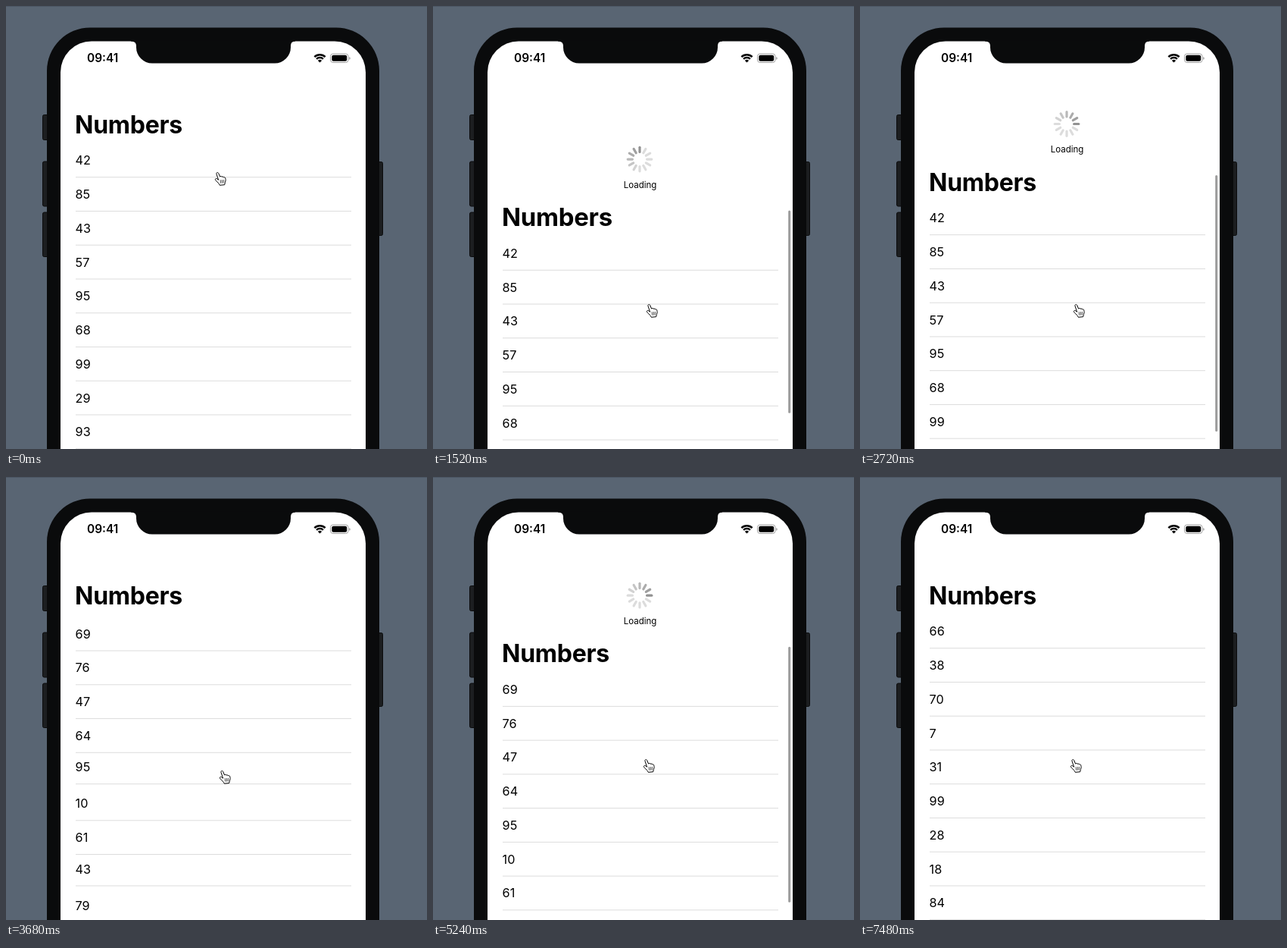
An HTML page for the animation above (7.52 s loop, 556 by 584 pixels).

```html
<!DOCTYPE html>
<html lang="en">
<head>
<meta charset="utf-8">
<title>Pull to refresh</title>
<style>
  html, body { margin: 0; width: 100%; height: 100%; overflow: hidden; background: #596573; }
  svg { display: block; width: 556px; height: 584px; font-family: Inter, "Open Sans", sans-serif; }
  .row { font-size: 16.2px; }
  .row line { stroke: #dcdcdc; }
  .title { font-size: 32px; font-weight: 700; letter-spacing: -.25px; }
  .time { font-size: 15.4px; font-weight: 600; }
  .label { font-size: 11.5px; text-anchor: middle; }
  .button { fill: #1c1e20; stroke: #0a0b0c; }
</style>
</head>
<body>
<svg viewBox="0 0 556 584">
  <defs>
    <clipPath id="screen"><rect x="72" y="46.5" width="403" height="700" rx="41"/></clipPath>
    <clipPath id="below"><rect x="72" y="137" width="403" height="447"/></clipPath>
  </defs>

  <rect width="556" height="584" fill="#596573"/>
  <rect width="556" height="1" fill="#4c5764"/>

  <g class="button">
    <rect x="48.5" y="143.5" width="10" height="33" rx="2"/>
    <rect x="48.5" y="205" width="10" height="59" rx="2"/>
    <rect x="48.5" y="272" width="10" height="58.5" rx="2"/>
    <rect x="487" y="205.5" width="10.5" height="97" rx="2"/>
  </g>
  <rect x="54" y="28.5" width="439" height="720" rx="57" fill="#0a0b0c"/>
  <rect x="72" y="46.5" width="403" height="700" rx="41" fill="#fff"/>

  <g clip-path="url(#screen)">
    <g id="rows"></g>
    <text id="title" class="title" x="0" y="0">Numbers</text>
    <g clip-path="url(#below)">
      <g id="control">
        <g id="spinner"></g>
        <g id="ticks"></g>
        <text id="label" class="label" x="273.5" y="37.8"></text>
      </g>
    </g>
    <rect id="bar" x="469.2" width="3" rx="1.5" fill="#9c9c9c"/>
  </g>

  <path d="M165 45.5h217v1q-6 0 -6 6v2a21 21 0 0 1 -21 21h-162a21 21 0 0 1 -21 -21v-2q0 -6 -7 -6z" fill="#0a0b0c"/>
  <text class="time" x="107" y="74.2">09:41</text>
  <g fill="none" stroke="#000" stroke-width="2.5">
    <path d="M407.4 67.2a10 10 0 0 1 14.2 0"/>
    <path d="M410.1 69.9a6.2 6.2 0 0 1 8.8 0"/>
    <path d="M414.5 74.6l-2.6 -2.6a3.7 3.7 0 0 1 5.2 0z" fill="#000" stroke="none"/>
  </g>
  <rect x="428.5" y="63" width="23.5" height="11.5" rx="3.4" fill="none" stroke="#a2a2a2"/>
  <rect x="430.3" y="64.8" width="19.9" height="7.9" rx="2"/>
  <path d="M453.2 67v3.8q1.6 -.6 1.6 -1.9t-1.6 -1.9z" fill="#a2a2a2"/>

  <g id="hand" stroke="#000" stroke-linejoin="round" stroke-linecap="round">
    <path fill="#fff" d="M5 9L3 3C2.5 1 4.9 .2 5.7 2L7.6 6.7C8 5.6 9.7 5.7 10 6.9C10.6 6 12 6.3 12.3 7.5C13 6.8 14.5 7.2 14.8 8.7C15.3 10.6 15.2 12 14.4 13.8L13.7 17.2L7.3 17.8C6.4 15.6 4.6 13.9 2.2 11.7C.5 10 1.7 8.5 3.4 9.1L5.5 10.5Z"/>
    <path fill="none" stroke-width=".7" d="M8.2 11.2l.4 3.6M10.3 11l.2 3.7M12.4 11l-.1 3.5"/>
  </g>
</svg>
<script>
  const LOOP = 7520, HOLD = 76, PITCH = 44.75;
  const LISTS = [
    [42, 85, 43, 57, 95, 68, 99, 29, 93],
    [69, 76, 47, 64, 95, 10, 61, 43, 79],
    [66, 38, 70, 7, 31, 99, 28, 18, 84]
  ];
  const PULLS = [
    { start: 400, trigger: 1440, release: 1600, end: 3430, grab: 159, fade: 2760 },
    { start: 4260, trigger: 4945, release: 4960, end: 6940, grab: 241, fade: 6120 }
  ];
  // time, x, y of the pointer
  const PATH = [
    [0, 283, 228], [240, 206, 159], [400, 206, 159], [1500, 289, 402], [3600, 289, 402],
    [3680, 289, 396], [4160, 284, 241], [4260, 284, 241], [4640, 285, 383],
    [4910, 286, 442], [4960, 286, 442], [5220, 285, 381], [LOOP, 285, 381]
  ];

  const $ = id => document.getElementById(id);
  const clamp = v => Math.max(0, Math.min(1, v));
  const wave = v => (1 - Math.cos(Math.PI * clamp(v))) / 2;
  const rubber = d => d <= 0 ? 0 : 922 * (1 - 1 / (d * .55 / 872 + 1));

  function add(parent, tag, attrs, text) {
    const el = document.createElementNS("http://www.w3.org/2000/svg", tag);
    for (const k in attrs) el.setAttribute(k, attrs[k]);
    if (text !== undefined) el.textContent = text;
    return parent.appendChild(el);
  }
  const move = (el, x, y, s = 1) => el.setAttribute("transform", `translate(${x} ${y}) scale(${s})`);
  const fade = (el, a) => el.setAttribute("opacity", a);

  const rows = LISTS.map(list => list.map(n => {
    const g = add($("rows"), "g", { class: "row" });
    add(g, "text", { x: 91.6, y: 209.3 }, n);
    add(g, "line", { x1: 92, x2: 456, y1: 225.7, y2: 225.7 });
    return g;
  }));

  const spokes = (id, count, y1, y2, width, color) => Array.from({ length: count }, (_, i) =>
    add($(id), "line", {
      x1: 0, x2: 0, y1, y2, stroke: color, "stroke-width": width,
      "stroke-linecap": "round", transform: `rotate(${i * 360 / count})`
    }));
  const spinner = spokes("spinner", 12, -9.6, -15.8, 3.2, "#808080");
  const ticks = spokes("ticks", 10, -9.2, -14.6, 2, "#000");
  move($("ticks"), 274.5, 0);

  function slope(i, axis) {
    if (i < 1 || i > PATH.length - 2) return 0;
    const rate = k => (PATH[k + 1][axis] - PATH[k][axis]) / (PATH[k + 1][0] - PATH[k][0]);
    const a = rate(i - 1), b = rate(i);
    return a * b <= 0 ? 0 : 2 * a * b / (a + b);
  }

  function pointer(t, axis) {
    let i = 0;
    while (i < PATH.length - 2 && t >= PATH[i + 1][0]) i++;
    const p = PATH[i], q = PATH[i + 1], span = q[0] - p[0], u = (t - p[0]) / span;
    const v = 1 - u;
    return p[axis] * v * v * (1 + 2 * u) + q[axis] * u * u * (3 - 2 * u)
      + span * u * v * (v * slope(i, axis) - u * slope(i + 1, axis));
  }

  function offset(t, p) {
    if (t < p.start) return 0;
    if (t < p.release) return rubber(pointer(t, 2) - p.grab);
    const settle = s => HOLD + (rubber(pointer(p.release, 2) - p.grab) - HOLD) * Math.exp((p.release - s) / 75);
    return t < p.end ? settle(t) : HOLD * (1 - wave((t - p.end) / 250));
  }

  function drawRows(t, off) {
    const now = PULLS.filter(p => t >= p.end).length;
    const since = now ? t - PULLS[now - 1].end : LOOP;
    const shown = clamp(since / 200);
    const late = HOLD * (1 - wave(since / 290));
    const settling = since < 300;
    rows.forEach((group, k) => group.forEach((row, i) => {
      const value = LISTS[k][i];
      let alpha = 0, y = off + i * PITCH;
      if (k === now) {
        const from = now ? LISTS[now - 1].indexOf(value) : i;
        alpha = from < 0 ? shown : 1;
        if (settling) y = from < 0 ? late + i * PITCH : off + (from + (i - from) * wave(since / 250)) * PITCH;
      } else if (k === now - 1 && !LISTS[now].includes(value)) {
        alpha = 1 - shown;
      }
      fade(row, alpha);
      move(row, 0, y);
    }));
  }

  function draw(t) {
    const p = t < PULLS[1].start ? PULLS[0] : PULLS[1];
    const off = offset(t, p);
    const loading = t >= p.trigger;
    const inset = loading ? HOLD * clamp((t - p.trigger) / 60) : 0;
    const over = Math.max(0, off - inset);

    drawRows(t, off);
    move($("title"), 91, 167.7 + off, t < p.end ? 1 + .0006 * over : 1);

    // refresh control
    const leave = clamp((t - p.end) / 200);
    const y = loading ? 79.5 + (t < p.end ? off : HOLD) : 82.5 + off;
    move($("control"), 0, y);
    fade($("control"), loading ? 1 - leave : clamp((off - 25) / 40));
    move($("spinner"), 273, 0, 1 - .6 * leave);
    fade($("spinner"), loading ? 1 : 0);
    fade($("ticks"), loading ? 0 : 1);
    $("label").textContent = loading ? "Loading" : "Pull to refresh";
    const step = Math.floor((t - p.trigger) * 12 / 1000);
    spinner.forEach((s, i) => fade(s, Math.max(.27, .85 - .1 * (((step - i) % 12 + 12) % 12))));
    // ticks appear clockwise, the one at the top last
    const reach = off / HOLD * 9;
    ticks.forEach((s, i) => {
      const n = i || 10;
      fade(s, clamp(reach - n + 1) * (.04 + .09 * n));
    });

    // scroll indicator
    const length = loading ? 338 - 1.52 * Math.max(0, off - HOLD) : 338 - off;
    $("bar").setAttribute("y", 147 + off);
    $("bar").setAttribute("height", length);
    fade($("bar"), t < p.start ? 0 : clamp((t - p.start) / 80) * (1 - clamp((t - p.fade) / 240)));

    move($("hand"), pointer(t, 1) - 8, pointer(t, 2) - 9.5);
  }

  const begin = performance.now();
  function frame() {
    draw((performance.now() - begin) % LOOP);
    requestAnimationFrame(frame);
  }
  frame();
</script>
</body>
</html>
```
